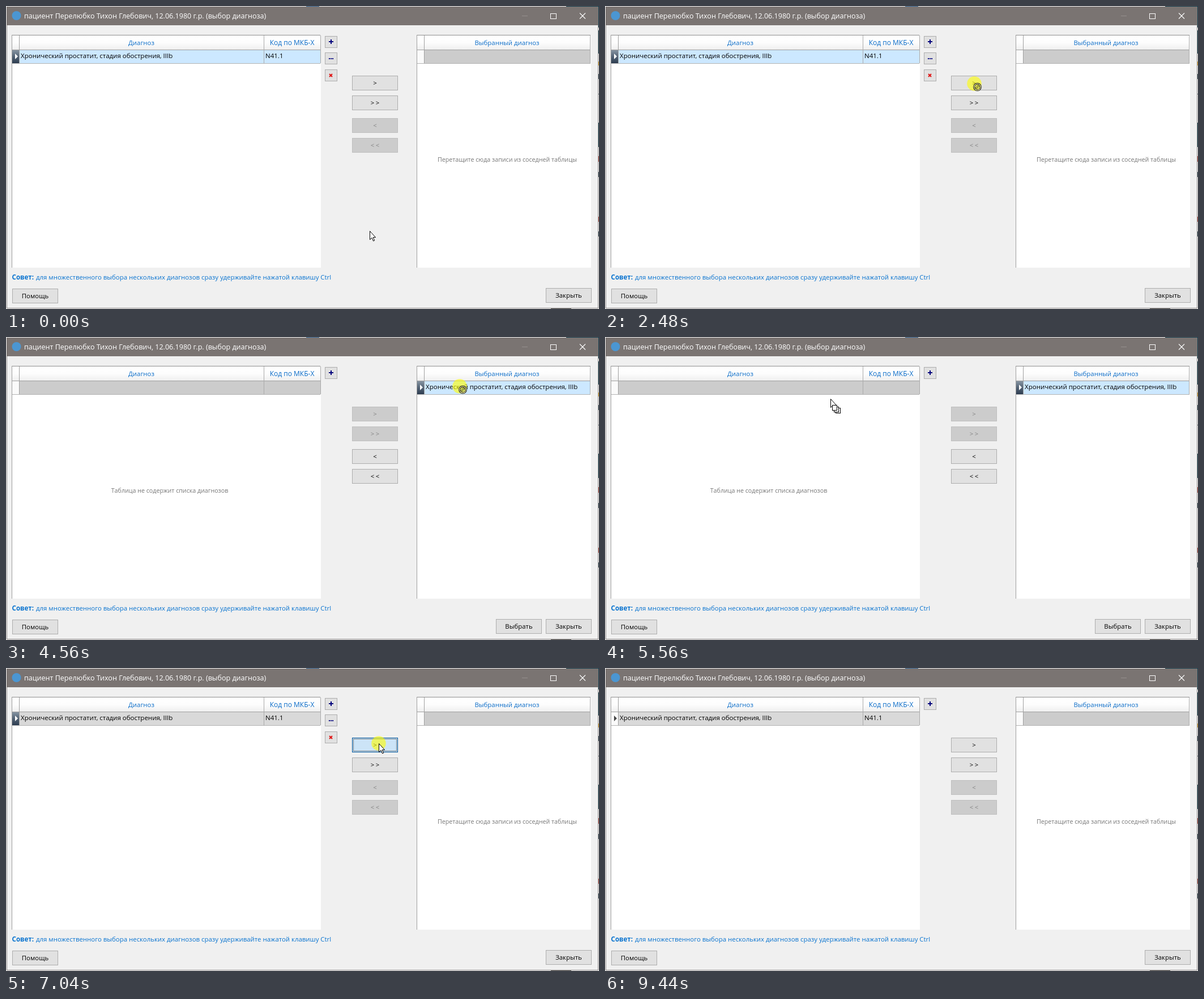
Write an HTML page with a canvas that moves like this. It is 1047 px wide and 535 px high and loops after 10000 ms.

```html
<!DOCTYPE html>
<html lang="ru">
<head>
<meta charset="utf-8">
<title>Выбор диагноза</title>
<style>
html, body { margin: 0; width: 100%; height: 100%; overflow: hidden; background: #f0f0f0; }
canvas { display: block; }
</style>
</head>
<body>
<canvas id="stage" width="1047" height="535"></canvas>
<script>
const ctx = document.getElementById('stage').getContext('2d');
const LOOP = 10000;
const FADE = 250;
const DROP_RIGHT = 2920, DROP_LEFT = 5640, CLICK_RIGHT = 7200, CLICK_LEFT = 8640;
const DIAGNOSIS = 'Хронический простатит, стадия обострения, IIIb';

// Pointer waypoints: time, x, y, optional downward bow of the segment
const PATH = [
  [0, 642, 397], [480, 642, 397], [1240, 324, 68], [1400, 315, 92], [1839, 315, 92],
  [1840, 327, 104], [2840, 787, 128, 20], [3300, 787, 128], [3480, 815, 185],
  [3680, 815, 185], [3960, 826, 58], [4120, 808, 86], [4559, 808, 86],
  [4560, 801, 87], [5560, 398, 109], [5900, 398, 109], [6560, 658, 133],
  [7350, 658, 133], [8000, 656, 212], [8900, 656, 212], [9440, 642, 397]
];
const PRESSES = [[1840, 2820], [4560, 5540], [7000, CLICK_RIGHT], [8480, CLICK_LEFT]];

const within = (t, a, b) => t >= a && t < b;
const ramp = (t, start, length = FADE) => Math.min(1, Math.max(0, (t - start) / length));
const mix = (a, b, p) => `rgb(${a.map((v, i) => Math.round(v + (b[i] - v) * p)).join()})`;
const blend = (a, b, p) => a.map((v, i) => v + (b[i] - v) * p);
const gray = v => [v, v, v];

function rect(x, y, w, h, fill) {
  ctx.fillStyle = fill;
  ctx.fillRect(x, y, w, h);
}

function frame(x, y, w, h, color) {
  ctx.strokeStyle = color;
  ctx.lineWidth = 1;
  ctx.strokeRect(x + .5, y + .5, w - 1, h - 1);
}

function text(str, x, y, size, color = '#000', align = 'left', weight = 400) {
  ctx.font = `${weight} ${size}px "Open Sans", "Noto Sans", sans-serif`;
  ctx.textAlign = align;
  ctx.fillStyle = color;
  ctx.fillText(str, x, y);
}

function shade(y, h, ...colors) {
  const g = ctx.createLinearGradient(0, y, 0, y + h);
  colors.forEach((c, i) => g.addColorStop(i / (colors.length - 1), c));
  return g;
}

function shape(points, fill, stroke) {
  ctx.beginPath();
  points.forEach(([x, y]) => ctx.lineTo(x, y));
  ctx.closePath();
  ctx.fillStyle = fill;
  ctx.fill();
  if (!stroke) return;
  ctx.strokeStyle = stroke;
  ctx.lineWidth = 1;
  ctx.stroke();
}

function line(x1, y1, x2, y2, color, width = 1) {
  ctx.beginPath();
  ctx.moveTo(x1, y1);
  ctx.lineTo(x2, y2);
  ctx.strokeStyle = color;
  ctx.lineWidth = width;
  ctx.stroke();
}

function drawDesktop() {
  rect(0, 0, 1047, 535, '#f4f4f4');
  rect(530, 0, 23, 1, '#3d6f9f');
  rect(989, 0, 58, 1, '#143c4c');
  rect(962, 534, 36, 1, '#555');
  [[0, 38], [43, 41], [206, 43]].forEach(([y, h]) => rect(1045, y, 2, h, '#143c4c'));
  [[120, 9], [155, 1], [293, 9], [398, 9]].forEach(([y, h]) => rect(1046, y, 1, h, '#344a58'));
  [[265, 10], [372, 9]].forEach(([y, h]) => rect(1046, y, 1, h, '#b0524c'));
  rect(1046, 98, 1, 7, '#dfa52c');
}

function drawWindow() {
  rect(1, 1, 1045, 533, '#f0f0f0');
  frame(1, 1, 1045, 533, '#8b8785');
  rect(1, 1, 1045, 33, '#7a7472');
  ctx.beginPath();
  ctx.arc(18.5, 17, 8, 0, 7);
  ctx.fillStyle = '#4b96d2';
  ctx.fill();
  text('пациент Перелюбко Тихон Глебович, 12.06.1980 г.р. (выбор диагноза)', 32, 22, 12.55, '#fff');
  line(911, 17.5, 921, 17.5, '#96908e');
  frame(961, 13, 11, 10, '#fff');
  line(1013, 12.5, 1023, 22.5, '#fff', 1.1);
  line(1023, 12.5, 1013, 22.5, '#fff', 1.1);
  text('Совет:', 10.5, 483, 11.6, '#0a74d0', 'left', 700);
  text('для множественного выбора нескольких диагнозов сразу удерживайте нажатой клавишу Ctrl',
    53, 483, 11.42, '#0a74d0');
}

function drawTable({ x, right, columns, cells, full, focused, darkGutter, hint }) {
  const gutter = x + 13;
  rect(x, 52, right - x + 1, 410, '#fff');
  rect(x, 51, right - x, 1, '#8f8f8f');
  rect(x, 51, 1, 411, '#a0a0a0');
  rect(x + 1, 52, right - x - 1, 25, shade(52, 25, '#fff', '#fdfdfd', '#efefef'));
  rect(x + 1, 77, right - x - 1, 1, '#a0a0a0');

  rect(gutter + 1, 78, right - gutter - 1, 23, !full ? '#ccc' : focused ? '#cce8ff' : '#d9d9d9');
  const dark = full && darkGutter;
  rect(x + 1, 78, 12, 23, dark ? shade(78, 23, '#8694a2', '#526274', '#2d3d51') : '#fafafa');
  if (full) {
    shape([[x + 6, 84], [x + 11, 89], [x + 6, 94]], dark ? '#fff' : '#444');
  }
  rect(x + 1, 101, right - x - 1, 1, '#b4b4b4');
  rect(gutter, 52, 1, 49, '#a0a0a0');

  columns.forEach(([label, left, edge, size], i) => {
    rect(edge, 52, 1, 49, '#aaa');
    text(label, (left + edge) / 2, 69, size, '#0a6cc8', 'center');
    if (full) text(cells[i], left + 3, 92, 11.5);
  });
  if (!full) text(hint, (x + right) / 2 + 6.5, 275, 10.7, '#787878', 'center');
}

function button(x, y, label, { on = 1, hot = 0, pressed = false } = {}) {
  const w = 81, h = 26;
  const fill = blend(gray(204), gray(225), on);
  const edge = blend(gray(191), gray(173), on);
  rect(x, y, w, h, pressed ? '#cce4f7' : mix(fill, [229, 241, 251], hot));
  frame(x, y, w, h, pressed ? '#005499' : mix(edge, [0, 120, 215], hot));
  if (pressed) {
    ctx.setLineDash([1, 1]);
    frame(x + 2, y + 2, w - 4, h - 4, '#222');
    ctx.setLineDash([]);
  }
  text(label, x + w / 2, y + 17, 11.4, mix(gray(131), gray(0), on), 'center');
}

function drawTools(all) {
  const box = y => {
    rect(563, y, 22, 21, '#e1e1e1');
    frame(563, y, 22, 21, '#adadad');
  };
  box(53);
  line(570, 63, 578, 63, '#00007c', 2);
  line(574, 59, 574, 67, '#00007c', 2);
  if (!all) return;
  box(82);
  [570, 573, 576].forEach(x => rect(x, 92, 2, 2, '#00007c'));
  box(112);
  line(571, 120, 576, 125, '#e00f0f', 2);
  line(576, 120, 571, 125, '#e00f0f', 2);
}

function pointerAt(t) {
  const i = PATH.findIndex(([time]) => time > t);
  if (i < 0) return PATH[PATH.length - 1].slice(1, 3);
  const [t0, x0, y0] = PATH[i - 1], [t1, x1, y1, bow = 0] = PATH[i];
  const p = (t - t0) / (t1 - t0), e = p * p * (3 - 2 * p);
  return [x0 + (x1 - x0) * e, y0 + (y1 - y0) * e + bow * Math.sin(Math.PI * e)];
}

function drawArrow() {
  shape([[.5, .5], [.5, 15.5], [4, 12.3], [6.6, 18], [8.7, 17], [6.2, 11.5], [10.5, 11.5]],
    '#fff', '#000');
}

function drawPages() {
  [[9, 16], [6, 14], [3, 11]].forEach(([x, y]) => {
    rect(x, y, 9, 10, '#fff');
    frame(x, y, 9, 10, '#000');
  });
}

function drawForbidden() {
  const ring = (color, width) => {
    ctx.beginPath();
    ctx.arc(5.5, 6, 5.7, 0, 7);
    ctx.strokeStyle = color;
    ctx.lineWidth = width;
    ctx.stroke();
  };
  ring('#111', 3.2);
  ring('#f4f0a0', 1.2);
  line(1.6, 8.4, 7.9, 2.1, '#111');
  line(3.1, 9.9, 9.4, 3.6, '#111');
}

function drawPointer(t) {
  if (t >= 9440) return;
  const [x, y] = pointerAt(t).map(Math.round);
  if (PRESSES.some(([a, b]) => within(t, a, b))) {
    ctx.beginPath();
    ctx.arc(x, y, 12.8, 0, 7);
    ctx.fillStyle = 'rgba(255,255,0,.6)';
    ctx.fill();
  }
  const toRight = within(t, 1840, DROP_RIGHT), toLeft = within(t, 4560, DROP_LEFT);
  const accepts = toRight && x > 725 || toLeft && x < 556;
  ctx.save();
  ctx.translate(x, y);
  if ((toRight || toLeft) && !accepts) drawForbidden();
  else {
    drawArrow();
    if (accepts) drawPages();
  }
  ctx.restore();
}

function draw(t) {
  const inRight = within(t, DROP_RIGHT, DROP_LEFT) || within(t, CLICK_RIGHT, CLICK_LEFT);
  const backOn = ramp(t, DROP_RIGHT) - ramp(t, DROP_LEFT) + ramp(t, CLICK_RIGHT) - ramp(t, CLICK_LEFT);
  const forward = { on: 1 - backOn }, back = { on: backOn };

  drawDesktop();
  drawWindow();
  drawTable({
    x: 10, right: 555, full: !inRight, focused: t < 7000, darkGutter: t < CLICK_RIGHT,
    columns: [['Диагноз', 23, 455, 11.4], ['Код по МКБ-Х', 455, 555, 12]],
    cells: [DIAGNOSIS, 'N41.1'],
    hint: 'Таблица не содержит списка диагнозов'
  });
  drawTable({
    x: 725, right: 1032, full: inRight, focused: t < DROP_LEFT, darkGutter: t < DROP_LEFT,
    columns: [['Выбранный диагноз', 738, 1031, 11.4]],
    cells: [DIAGNOSIS],
    hint: 'Перетащите сюда записи из соседней таблицы'
  });
  drawTools(!inRight && t < CLICK_RIGHT);

  button(611, 123, '>', {
    ...forward, hot: ramp(t, 6400, 160) - ramp(t, CLICK_RIGHT), pressed: within(t, 7000, CLICK_RIGHT)
  });
  button(611, 158, '>\u2009>', forward);
  button(611, 198, '<', {
    ...back, hot: ramp(t, 7880, 240) - ramp(t, CLICK_LEFT), pressed: within(t, 8480, CLICK_LEFT)
  });
  button(611, 233, '<\u2009<', back);
  button(11, 499, 'Помощь');
  if (inRight) button(865, 498, 'Выбрать');
  button(953, 498, 'Закрыть');
  drawPointer(t);
}

function tick() {
  draw(performance.now() % LOOP);
  requestAnimationFrame(tick);
}
tick();
</script>
</body>
</html>
```
